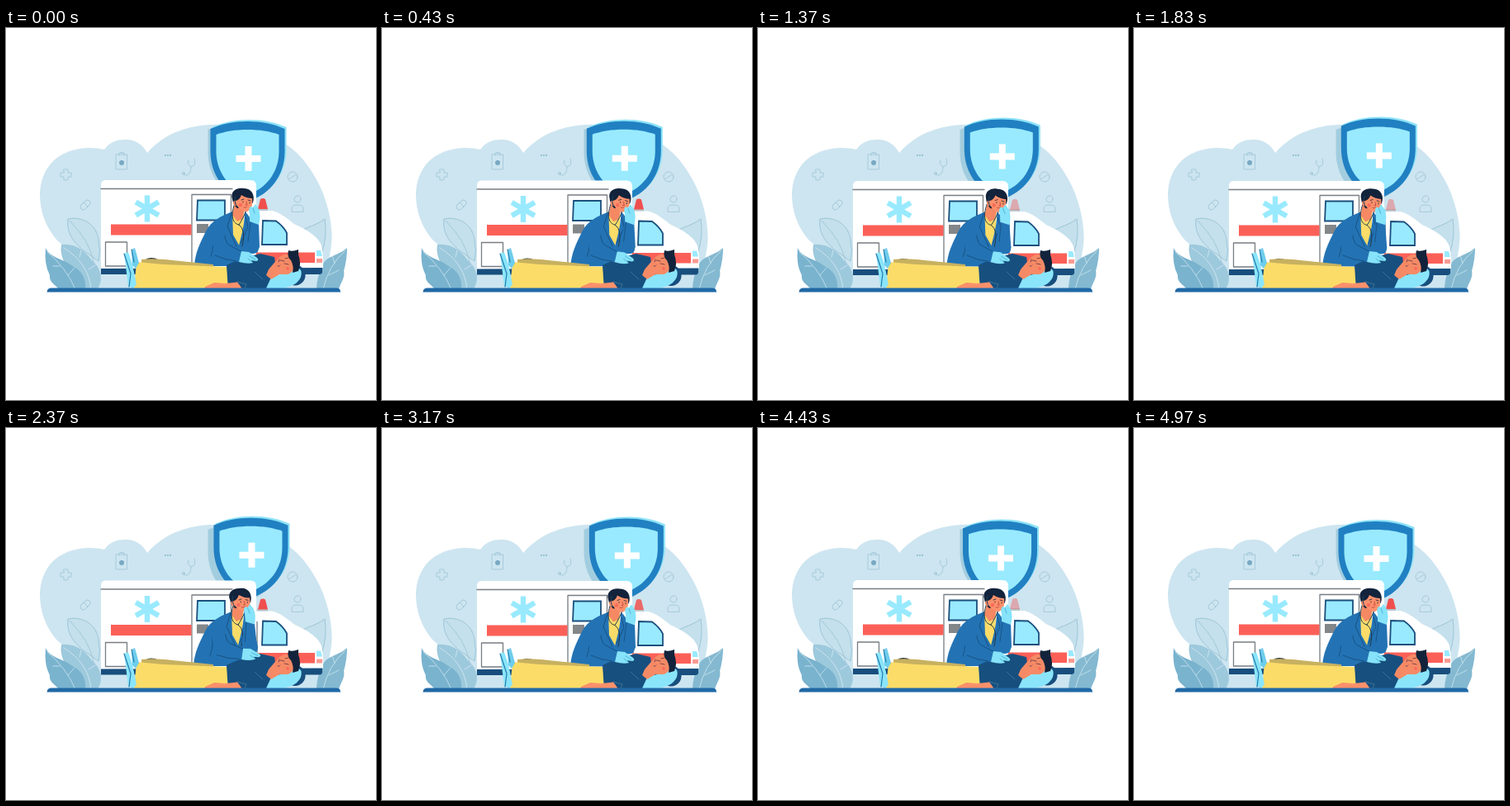
Animation, 448 px wide and 450 px high, one loop 5.01 s. Source, as an HTML page:

```html
<!DOCTYPE html>
<html lang="en">
<head>
<meta charset="utf-8">
<title>First aid</title>
<style>
html, body { margin: 0; width: 100%; height: 100%; overflow: hidden; background: #fff; }
svg { display: block; width: 448px; height: 450px; }
.line { fill: none; stroke-linecap: round; stroke-linejoin: round; }
</style>
</head>
<body>
<svg viewBox="0 0 448 450">
  <defs>
    <path id="plate" d="M292.500 113C276 113 261 116 247.500 122V150C248 179 265 201 292.500 210C320 201 337 179 337.500 150V122C324 116 309 113 292.500 113Z"/>
  </defs>

  <path fill="#cde5f0" d="M110 316C95 285 80 272 62 257C48 241 41 222 41 201C42 176 54 157 77 149C92 144 106 144 119 147C126 138 133 135 145 135C158 135 166 142 171 151C187 133 208 121 240 117.500C270 114 316 124 341 142C357 153 369 170 378 187C390 210 398 245 393 269L385 316Z"/>

  <g class="line" stroke="#a2c7d8" stroke-width=".9">
    <path d="M70 171h5v4h4v5h-4v4h-5v-4h-4v-5h4z"/>
    <rect x="89" y="210.500" width="14" height="7" rx="3.500" transform="rotate(-43 96 214)"/>
    <path d="M94 211l5 5"/>
    <path d="M133.500 153h13v18h-13zM137 154v-3h6v3M139 151q1-2 2 0"/>
    <path d="M228 158q3 8-4 10q-5-3-3-8M224 168q0 9-5 10q-4 1-4-3"/>
    <circle cx="215" cy="176" r="1.500"/>
    <circle cx="347" cy="180" r="6"/>
    <path d="M342.500 183l9-6"/>
    <circle cx="353" cy="207" r="4"/>
    <path d="M346 222v-3q0-5 7-5t7 5v3z"/>
  </g>
  <circle cx="140" cy="163" r="3" fill="#78a9c4"/>
  <g fill="#84b3cb">
    <circle cx="193" cy="154" r="1"/><circle cx="196" cy="154" r="1"/><circle cx="199" cy="154" r="1"/>
  </g>

  <!-- foliage -->
  <path fill="#c4e0ec" stroke="#91bdd1" stroke-width=".8" d="M75 231C94 227 110 239 112 256Q115 270 112 282L95 270C81 259 73 247 75 231Z"/>
  <path fill="#9dc9dc" d="M67 262C84 260 96 270 104 281C114 290 119 302 111 316H84C84 302 77 292 71 284Q65 273 67 262Z"/>
  <path fill="#79b3ce" d="M48 266C53 278 69 279 79 287C93 294 97 304 96 316H64C58 309 52 307 53 299Q46 286 48 266Z"/>
  <g class="line" stroke="#eaf6fb" stroke-width=".6">
    <path d="M70 266Q100 284 103 316M50 271Q73 290 84 316M89 277l2-8M100 292l8-5M65 288l-8 0M75 299l8-9"/>
  </g>
  <path class="line" stroke="#91bdd1" stroke-width=".7" d="M77 233Q101 257 106 282"/>
  <path fill="#c4e0ec" stroke="#91bdd1" stroke-width=".8" d="M386 231C373 241 357 241 351 252C360 256 369 263 375 276L383 270Q389 252 386 231Z"/>
  <path fill="#84b9d1" d="M413 266C402 276 387 275 383 288Q376 302 376 316H403C405 308 411 302 409 294Q413 280 413 266Z"/>
  <g class="line" stroke="#eaf6fb" stroke-width=".6">
    <path d="M410 270Q390 288 384 316M398 284l-3-8M391 299l12-6"/>
  </g>

  <use href="#plate" x="-3" y="1" fill="#a2cddf"/>
  <g id="shield">
    <use href="#plate" x="2" y="-2" fill="#8be2f7"/>
    <use href="#plate" fill="#2180c2"/>
    <path fill="#99eafe" d="M292.500 123C278 123 265 125 254.500 129V150C255 175 270 194 292.500 202C315 194 330 175 330.500 150V129C320 125 307 123 292.500 123Z"/>
    <path fill="#fff" d="M289.500 143h8v11h11v8h-11v11h-8v-11h-11v-8h11z"/>
  </g>

  <g id="van">
    <path fill="#184e7d" d="M115 289H383V295Q383 298 379 298H115Z"/>
    <path fill="#fff" d="M115 291V190Q115 184 121 184H296Q303 184 303 191V221H322C332 223 341 231 349 237C361 243 377 250 382 263L384 276V290Z"/>
    <g class="line" stroke="#777e84" stroke-width="1.300">
      <path d="M115 194.500H274M120.500 259H146.500V288H120.500ZM225 290V201.500H272.500V290M304 290V234"/>
    </g>
    <g class="line" stroke="#99eafe" stroke-width="6.500" style="stroke-linecap:butt">
      <path id="ray" d="M171 202.500V234.500"/>
      <use href="#ray" transform="rotate(60 171 218.500)"/>
      <use href="#ray" transform="rotate(-60 171 218.500)"/>
    </g>
    <path fill="#fb6058" d="M127 237.500H224.500V250.500H127ZM303 271.500H374V284H303Z"/>
    <path fill="#84878a" d="M231 237h14v11h-14z"/>
    <path fill="#99eafe" stroke="#1b507e" stroke-width="1.800" d="M232 208.500H265V232.500H231Z"/>
    <path fill="#99eafe" stroke="#1b507e" stroke-width="1.800" d="M311 233L327 233.500Q336 240 340 248V262H310Z"/>
    <path fill="#99eafe" d="M376 269h5l2 7h-7z"/>
    <path fill="#fb9a92" d="M376 279h7v5h-7z"/>
    <path fill="#bbc4ca" d="M304 218h13v3h-13z"/>
    <path id="lamp" fill="#ef504d" d="M308 207Q311 205 314 207L317 219H305Z"/>
    <path fill="#27323b" d="M165 287Q167 278 176 278Q186 278 189 287Z"/>
    <circle cx="350" cy="299" r="12.500" fill="#184e7d"/>
  </g>

  <!-- rescuer -->
  <g id="woman">
    <path fill="#fbdc68" d="M273 222L288 224L287 264H274Z"/>
    <path fill="#f48964" d="M277 212L290 217L286 231L280 234L274 226Z"/>
    <path fill="#2373b4" d="M274 222C262 227 248 233 242 246C235 260 229 272 228 288H286L284 266L275 250Z"/>
    <path fill="#2373b4" d="M289 222C296 227 300 239 303 251L306 265Q306 273 299 273L280 271L285 251Q289 236 289 222Z"/>
    <path class="line" stroke="#174e7d" stroke-width=".9" d="M273 224L268 240L279 264M248 276Q253 262 250 250M290 229L293 241L284 260"/>
    <path class="line" stroke="#243a4c" stroke-width="1" d="M277 212C270 231 277 237 282 238Q291 244 286 264M292 218Q287 231 282 238"/>
    <g id="head">
      <path fill="#12233b" d="M274 207C271 197 280 193 287 194C297 193 302 202 299 211L295 216L280 218Q275 214 274 207Z"/>
      <path fill="#fc906b" d="M278 209Q283 208 285 202Q291 206 298 206C299 214 297 220 292 222Q284 222 280 215Q275 216 275 211Q276 208 278 209Z"/>
      <g class="line" stroke="#32303b" stroke-width=".9">
        <path d="M285 208l3-1M293 208l3 1M287 210v1M295 211v1"/>
        <path stroke="#bd4946" d="M291 210l1 4h-2M288 217q3 1 4-1"/>
      </g>
      <circle cx="284" cy="214" r="2.200" fill="#f96c5c"/>
      <path class="line" stroke="#1c3e59" d="M278 203Q276 211 279 215"/>
    </g>
    <g id="phoneArm">
      <path fill="#2373b4" d="M289 258L295 233L306 235L307 265Q303 274 294 271Z"/>
      <path class="line" stroke="#174e7d" stroke-width=".8" d="M296 235L293 258"/>
      <path fill="#86e3f9" d="M295 234L295 225Q293 219 296 216L299 217L302 213L306 219Q309 227 306 238Z"/>
      <path class="line" stroke="#45a9cc" stroke-width=".8" d="M299 218l2 6"/>
    </g>
  </g>

  <!-- patient -->
  <path fill="#c7b160" d="M164 280Q179 278 202 281L251 286V291H164Z"/>
  <path fill="#fbdc68" d="M158 283L191 286L268 289L270 314L155 316Z"/>
  <path fill="#6ecdec" d="M152 268L156 266L161 284L157 291L153 287Z"/>
  <path fill="#8ae5fb" d="M143 273L148 271L153 286L158 310L154 315L148 312Z"/>
  <path class="line" stroke="#267aab" stroke-width="1.200" d="M143 273L151 297L149 313M152 268L155 283"/>
  <path fill="#8ae5fb" d="M314 302Q335 300 350 290Q360 290 357 301C352 313 338 316 313 316Z"/>
  <path fill="#174f7e" d="M267 287Q284 278 308 273L325 277Q328 288 320 304L314 317H269Z"/>
  <path fill="#f68a66" d="M318 292L324 285L331 277Q338 271 347 276L351 286Q348 296 341 298L331 298L321 304L315 299Z"/>
  <path fill="#12233b" d="M342 269Q347 271 354 268L354 274Q358 285 354 294L347 296Q349 289 345 281Q340 277 342 269Z"/>
  <path class="line" stroke="#733f45" stroke-width=".9" d="M338 279l4-1M337 285l5 1M331 280l-1 3M337 282l-5-1M329 288q2 1 3-1"/>
  <circle cx="341" cy="291" r="2" fill="#f66e5c"/>
  <path fill="#fc906b" d="M241 313L252 308L266 309L284 307L292 311L288 317L264 315L255 317L240 316Z"/>
  <path fill="#174f7e" d="M280 307L301 295L315 305L312 317L287 317Z"/>
  <path class="line" stroke="#3d769d" stroke-width=".9" d="M280 307L291 310L288 317M301 295L311 304"/>

  <g id="restingArm">
    <path fill="#2373b4" d="M247 247L264 247L269 262L286 271L283 283Q266 282 253 275Z"/>
    <path class="line" stroke="#174e7d" stroke-width=".9" d="M265 251Q266 261 271 263L286 271L283 282M253 275Q266 281 279 282"/>
    <path fill="#86e3f9" d="M285 270L294 271L304 278Q307 281 303 282L297 281L299 284Q293 286 282 283Z"/>
    <path class="line" stroke="#45a9cc" stroke-width=".8" d="M295 276l7 4M293 279l5 4"/>
  </g>

  <path fill="#2069a6" d="M49.500 319.500Q50 314.500 55 314.500H400Q405 314.500 405 319.500Z"/>
</svg>
<script>
const LOOP = 5010, TAU = 2 * Math.PI;
const times = [0, 870, 1830, 2370, 3170, 3970, LOOP];
const part = id => document.getElementById(id);
const [shield, van, lamp, woman, head, phoneArm, restingArm] =
  ['shield', 'van', 'lamp', 'woman', 'head', 'phoneArm', 'restingArm'].map(part);

// smooth interpolation between poses
function pose(t, ...values) {
  let i = 0;
  while (t >= times[i + 1]) i++;
  const u = (t - times[i]) / (times[i + 1] - times[i]);
  return values[i] + (values[i + 1] - values[i]) * u * u * (3 - 2 * u);
}
const move = (el, x, y, turn = '') =>
  el.setAttribute('transform', `translate(${x} ${y}) ${turn}`);

function draw(now) {
  const t = now % LOOP;
  const drift = (1 - Math.cos(TAU * t / LOOP)) / 2;
  move(shield, 4 * drift, -4.2 * drift);
  move(van, 0, pose(t, 0, 1, 1, .5, 1, 0, 0));

  const glow = .5 + Math.cos(TAU * (2 * t / LOOP - .07));
  lamp.setAttribute('opacity', Math.max(.4, Math.min(1, glow)));

  move(woman, pose(t, 0, .6, .2, -1, 0, 0, 0), pose(t, 0, .5, .5, 0, .5, 0, 0));
  move(head, pose(t, 0, 1.2, .3, -1, 0, 0, 0), 0,
    `rotate(${pose(t, 0, 5, 2, -3, 0, 0, 0)} 285 225)`);
  move(phoneArm, pose(t, 0, -1, -1, -2, 0, 0, 0), 0,
    `rotate(${pose(t, 0, -2, -2, -4, 0, 0, 0)} 299 266)`);
  move(restingArm, 0, 0, `rotate(${pose(t, 0, 1, 0, -5, 0, 0, 0)} 250 245)`);
  requestAnimationFrame(draw);
}
requestAnimationFrame(draw);
</script>
</body>
</html>
```
